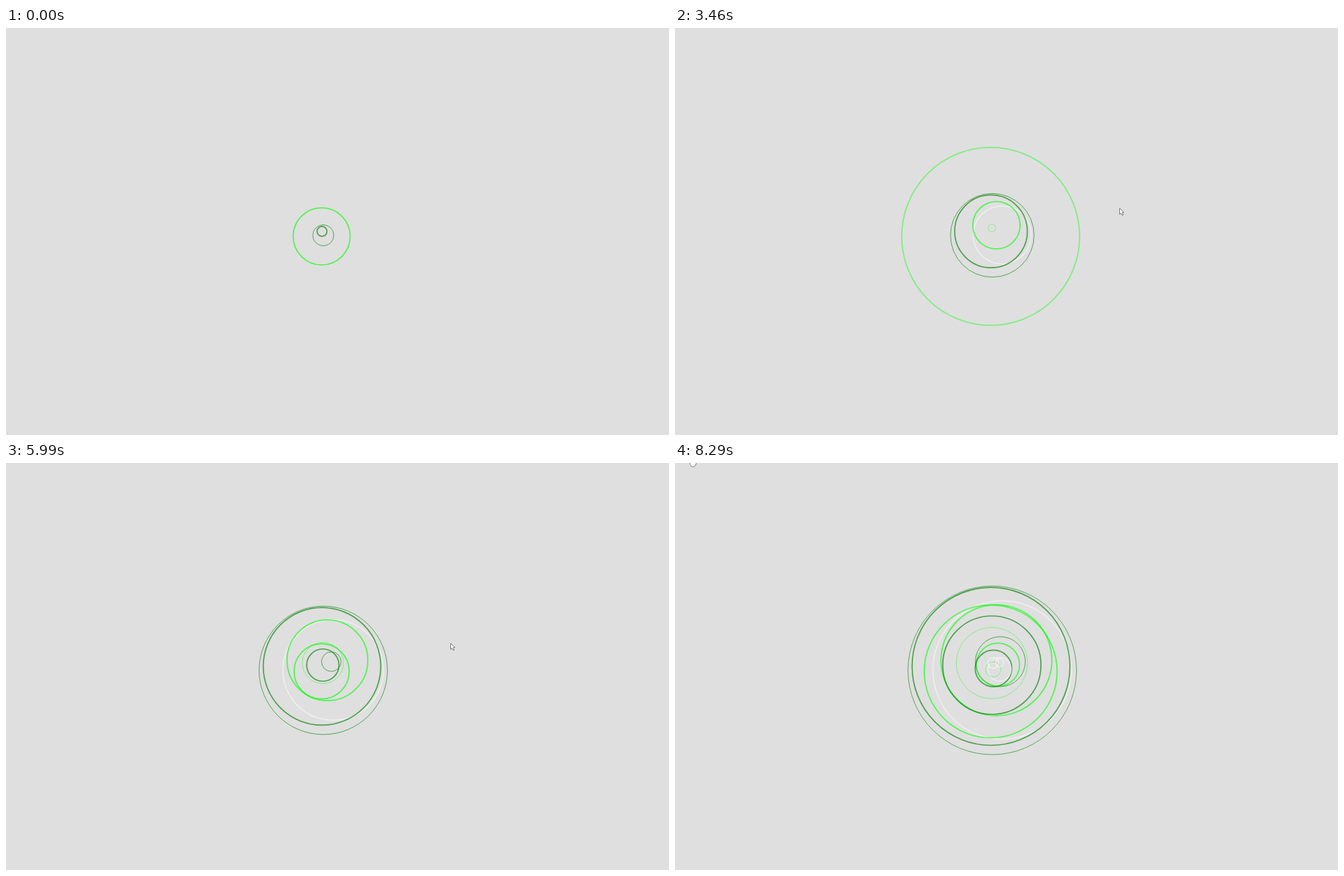
Animation, 955 px wide and 586 px high, one loop 8560 ms. Source, as an HTML page with a canvas:

```html
<!DOCTYPE html>
<html lang="en">
<head>
<meta charset="utf-8">
<title>Growing rings</title>
<style>
  html, body { margin: 0; width: 100%; height: 100%; overflow: hidden; background: #dfdfdf; }
  canvas { display: block; }
</style>
</head>
<body>
<canvas width="955" height="586"></canvas>
<script>
const ctx = document.querySelector('canvas').getContext('2d');
const LOOP = 8560, STEP = 251, FIRST = 175, LAST_STEP = 33;
const MAX_RADIUS = 150.6;   // a ring restarts from its centre here

const LIME = { rgb: '0,255,0', alpha: .62, width: 1.8 };
const PALE = { rgb: '0,255,0', alpha: .4, width: 1 };
const GREEN = { rgb: '0,128,0', alpha: .66, width: 1.7 };
const FINE = { rgb: '0,128,0', alpha: .62, width: 1 };
const MIST = { rgb: '255,255,255', alpha: .5, width: 1.5 };

const ring = (style, x, y, birth, growth) => ({ style, x, y, birth, growth });

// Births are in steps, growth in pixels per step.
const rings = [
  ring(MIST, 471.2, 298, .3, 3.05),
  ring(LIME, 454.7, 300, -6.6, 6.22),
  ring(FINE, 457, 298.5, -4.7, 3.22),
  ring(GREEN, 455.2, 292.8, -2.2, 3.23),
  ring(LIME, 463, 284, -.15, 2.41),
  ring(PALE, 456.5, 288, 11.7, 2.41),
  ring(FINE, 468.6, 286, 18.2, 2.43),
  ring(GREEN, 456.4, 291, 19.6, 5.28),
  ring(LIME, 465.2, 290.4, 26.6, 4.86),
  ring(GREEN, 458.8, 295.8, 27.5, 4.8)
];
// The last four start a quarter turn apart, each later and slower.
for (let k = 0; k < 4; k++) {
  const angle = (k + .5) * Math.PI / 2;
  rings.push(ring(k === 1 ? PALE : MIST, 463 + 6.5 * Math.cos(angle),
    292.5 + 6.5 * Math.sin(angle), 29.5 + .3 * k, 4.8 / (1 + .4 * k)));
}

// Pointer path: step, x, y
const path = [[1, 237, 122], [4, 557, 230], [6, 640, 259], [27, 640, 259],
  [28, 486, 163], [29, 262, 93], [32, 38, 1]];

function drawRing({ style, x, y, birth, growth }, step) {
  const r = (step - birth) * growth % MAX_RADIUS;
  if (r < 1) return;
  const fade = Math.max(0, Math.min(1, (146 - r) / 26));
  ctx.lineWidth = style.width;
  ctx.strokeStyle = `rgba(${style.rgb},${style.alpha * fade})`;
  ctx.beginPath();
  ctx.arc(x, y, r, 0, 2 * Math.PI);
  ctx.stroke();
}

function drawPointer(step) {
  if (step < 1) return;
  ctx.beginPath();
  if (step === LAST_STEP) {
    ctx.ellipse(26, 0, 4.5, 5.5, 0, 0, Math.PI);   // tip of a hand leaving the stage
  } else {
    const i = path.findIndex(p => p[0] >= step);
    const [s1, x1, y1] = path[i], [s0, x0, y0] = path[Math.max(0, i - 1)];
    const part = s1 > s0 ? (step - s0) / (s1 - s0) : 1;
    const x = Math.round(x0 + (x1 - x0) * part) + .5;
    const y = Math.round(y0 + (y1 - y0) * part) + .5;
    for (const [dx, dy] of [[0, 0], [0, 9], [2, 7], [3.5, 10], [5, 10], [4, 6], [6, 6]])
      ctx.lineTo(x + dx, y + dy);
    ctx.closePath();
  }
  ctx.fillStyle = '#fff';
  ctx.strokeStyle = '#777';
  ctx.lineWidth = 1;
  ctx.fill();
  ctx.stroke();
}

function draw(now) {
  const time = now % LOOP;
  const step = Math.min(LAST_STEP, Math.floor((time - FIRST) / STEP) + 1);
  ctx.fillStyle = '#dfdfdf';
  ctx.fillRect(0, 0, 955, 586);
  for (const r of rings) drawRing(r, step);
  drawPointer(step);
}

const start = performance.now();
function loop() {
  draw(performance.now() - start);
  requestAnimationFrame(loop);
}
loop();
</script>
</body>
</html>
```
